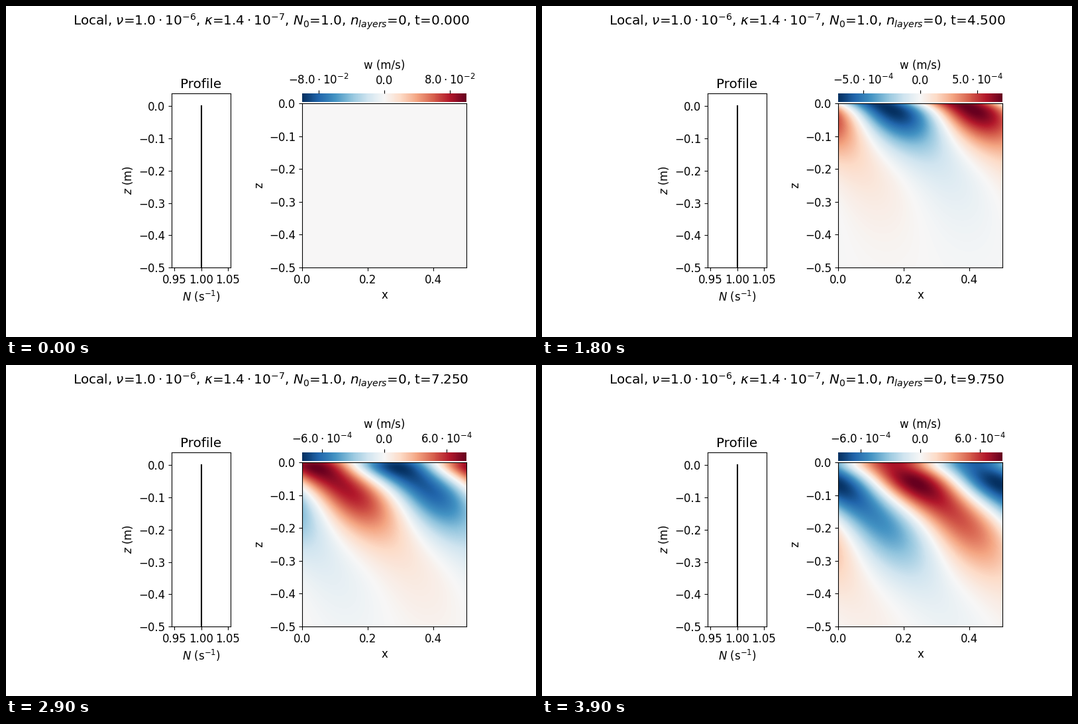
Write a matplotlib script that moves like this. It is 800x500 px and loops after 4 s.

```python
import numpy as np
import matplotlib.pyplot as plt
from matplotlib.animation import FuncAnimation

WIDTH, HEIGHT, DPI = 800, 500, 100
FRAMES, INTERVAL, DT = 40, 100, 0.25

AMP = 7.071e-4            # forcing amplitude of w at the surface (m/s)
OMEGA = np.sqrt(0.5)      # forcing frequency, N = 1
K = 2 * np.pi / 0.5       # horizontal wavenumber
CELLS = 248

plt.rcParams.update({"font.family": "DejaVu Sans", "font.size": 12})


def add_axes(left, top, right, bottom):
    """Axes given by pixel edges, measured from the top left."""
    return fig.add_axes([left / WIDTH, 1 - bottom / HEIGHT,
                         (right - left) / WIDTH, (bottom - top) / HEIGHT])


def response(depth, t):
    """Complex amplitude at each depth of a wave forced at the surface from t = 0.

    Inverse Laplace transform; every singularity lies on the segment [-i, i],
    so the trapezoid rule on a circle around it converges quickly.
    """
    if t == 0:
        return np.zeros(len(depth), complex)
    s = 1.5 * np.exp(2j * np.pi * (np.arange(192) + 0.5) / 192)
    weight = np.exp(s * t) * s / (s + 1j * OMEGA)
    decay = np.exp(-K * depth[:, None] * np.sqrt(1 + 1 / s**2))
    return AMP * (decay * weight).mean(axis=1)


def title(t):
    return (r"Local, $\nu$=$1.0\cdot10^{-6}$, $\kappa$=$1.4\cdot10^{-7}$, "
            rf"$N_0$=1.0, $n_{{layers}}$=0, t={t:.3f}")


fig = plt.figure(figsize=(WIDTH / DPI, HEIGHT / DPI), dpi=DPI)
heading = fig.suptitle(title(0))

# Stratification profile
profile = add_axes(250, 132, 339, 395)
profile.plot([1, 1], [-0.5, 0], "k-")
profile.set(xlim=(0.945, 1.055), ylim=(-0.5, 0.04), title="Profile",
            xlabel=r"$N$ (s$^{-1}$)", ylabel=r"$z$ (m)")
profile.set_xticks([0.95, 1.0, 1.05])
profile.set_yticks(np.linspace(-0.5, 0, 6))

# Vertical velocity field
field = add_axes(447, 147, 695, 395)
x = (np.arange(CELLS) + 0.5) * 0.5 / CELLS
depth = np.linspace(0, 0.5, CELLS)
wave = np.exp(1j * K * x)
image = field.imshow(np.zeros((CELLS, CELLS)), cmap="RdBu_r", aspect="auto",
                     extent=(0, 0.5, -0.5, 0), interpolation="nearest")
field.set(xlabel="x", ylabel="z")
field.set_xticks([0, 0.2, 0.4])
field.set_yticks(np.linspace(-0.5, 0, 6))

# Colour bar
bar = add_axes(447, 132, 695, 145)
bar.imshow(np.linspace(-1, 1, 256)[None, :], cmap="RdBu_r", aspect="auto",
           extent=(-1, 1, 0, 1), interpolation="nearest")
bar.set_yticks([])
bar.xaxis.tick_top()
bar.tick_params(axis="x", pad=6.6)
for spine in bar.spines.values():
    spine.set_visible(False)
fig.text(571 / WIDTH, 1 - 95 / HEIGHT, "w (m/s)", ha="center", va="baseline")


def update(n):
    t = n * DT
    amp = response(depth, t)
    limit = np.abs(amp).max() if n else 0.1
    image.set_data((amp[:, None] * wave).imag)
    image.set_clim(-limit, limit)

    if n == 0:
        lead, power = 8, -2
    else:
        lead, power = (5 if t < 4.6 else 6), -4
    pos = lead * 10.0**power / limit
    label = rf"{lead}.0\cdot10^{{{power}}}"
    bar.set_xticks([-pos, 0, pos], [f"$-{label}$", "0.0", f"${label}$"],
                   va="baseline")
    bar.set_xlim(-1, 1)
    heading.set_text(title(t))
    return image, heading


anim = FuncAnimation(fig, update, frames=FRAMES, interval=INTERVAL,
                     init_func=lambda: update(0), repeat=True, repeat_delay=0)
plt.show()
```
